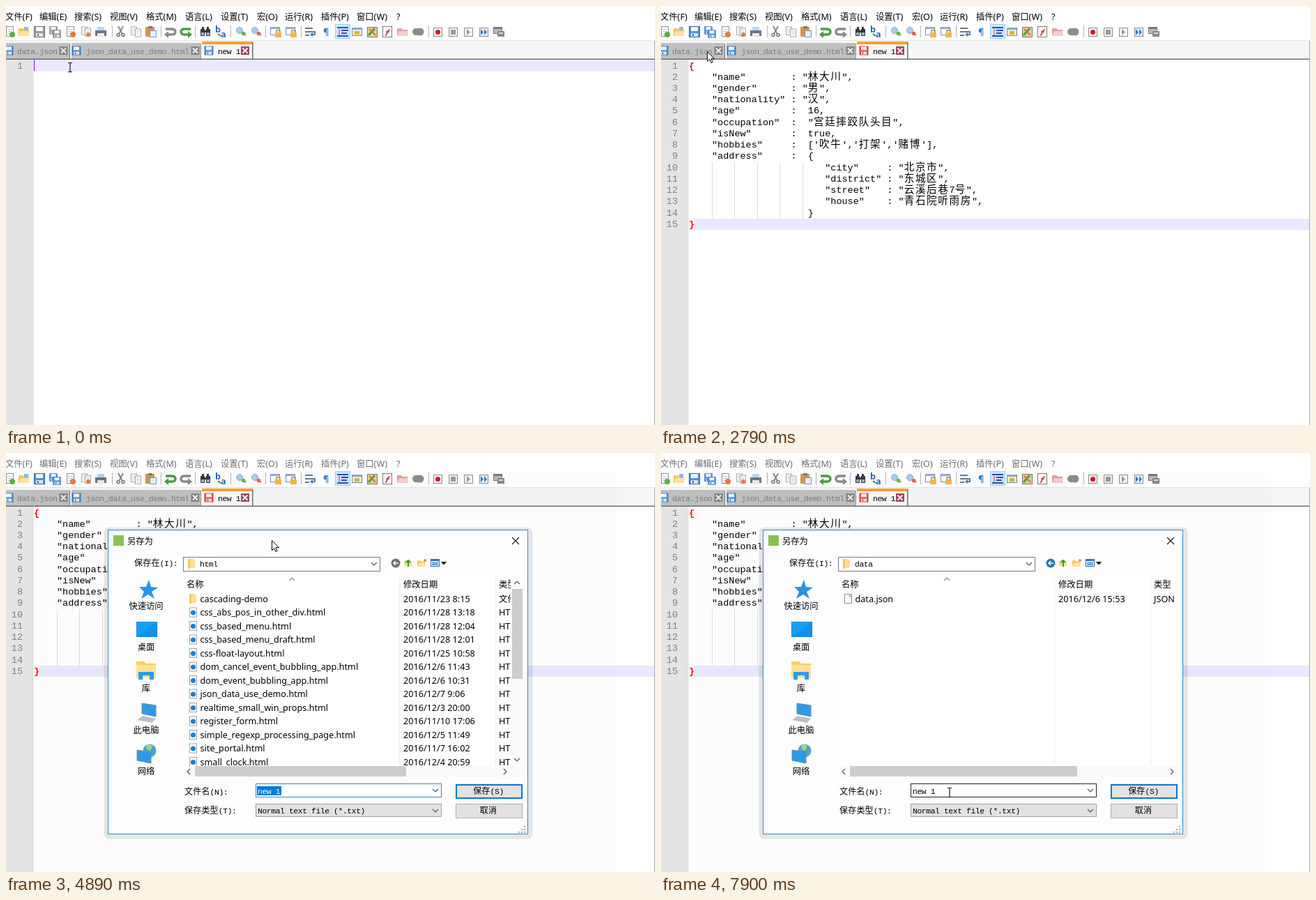
These frames come from a looping animation (931 by 601 pixels, 8 s). An HTML page:

```html
<!DOCTYPE html>
<html lang="zh-CN">
<head>
<meta charset="utf-8">
<style>
html, body { margin: 0; width: 100%; height: 100%; overflow: hidden; background: #fff; }
svg { display: block; width: 931px; height: 601px; }
text { white-space: pre; fill: #000; }
.ui { font: 12.65px 'Noto Sans', 'Noto Sans CJK SC', 'Noto Sans CJK', sans-serif; }
.ui .han { font-size: 12.3px; }
.mono { font: 11.4px 'Liberation Mono', 'Noto Sans CJK SC', 'Noto Sans CJK', monospace; letter-spacing: -.42px; }
.mono .han { font-size: 12px; font-weight: 300; letter-spacing: .2px; }
.code { font: 13.53px 'Liberation Mono', 'Noto Sans CJK SC', 'Noto Sans CJK', monospace; }
.code .han { font-size: 14.6px; font-weight: 300; letter-spacing: 1.6px; }
.num text { fill: #808080; text-anchor: end; }
.brace { fill: #f00; font-weight: bold; }
.dim { fill: #7d7d7d; }
.mid { text-anchor: middle; }
.blurred #menubar text { fill: #6d6d6d; }
.soft { fill: #e2e2e2; }
.opening .soft { fill: #f4f4f4; }
</style>
</head>
<body>
<svg id="stage" viewBox="0 0 931 601"></svg>
<script>
const stage = document.getElementById('stage');

// Drawing helpers
const rect = (x, y, w, h, fill, more = '') =>
  `<rect x="${x}" y="${y}" width="${w}" height="${h}" fill="${fill}" ${more}/>`;
const box = (x, y, w, h, fill, stroke, more = '') =>
  rect(x + .5, y + .5, w, h, fill, `stroke="${stroke}" ${more}`);
const path = (d, stroke, width = 1, fill = 'none') =>
  `<path d="${d}" stroke="${stroke}" stroke-width="${width}" fill="${fill}"/>`;
const fillPath = (d, fill) => path(d, 'none', 0, fill);
const disc = (x, y, r, fill, more = '') => `<circle cx="${x}" cy="${y}" r="${r}" fill="${fill}" ${more}/>`;
const text = (x, y, s, cls = 'ui', more = '') =>
  `<text x="${x}" y="${y}" class="${cls}" ${more}>${s.replace(/[\u4e00-\u9fff]+/g, '<tspan class="han">$&</tspan>')}</text>`;
const group = (cls, inner, more = '') => `<g class="${cls}" ${more}>${inner}</g>`;
const at = (x, y, inner, scale = 1) => `<g transform="translate(${x} ${y}) scale(${scale})">${inner}</g>`;
const swap = (before, after) => group('fresh', before) + group('pasted', after);
const chevron = (x, y, dx, dy, color = '#555') =>
  path(dx ? `M${x - 2 * dx} ${y - 4}l${4 * dx} 4l${-4 * dx} 4` : `M${x - 4} ${y - 2 * dy}l4 ${4 * dy}l4 ${-4 * dy}`, color, 1.2);

// Icons, centred on the origin
const floppy = (main, dark) => box(-8, -8, 15, 15, main, dark) + rect(-5, -7, 10, 6, '#f4f8fc') +
  rect(-5, 2, 10, 5, '#dfe8f0') + rect(-3, 3, 2, 3, dark);
const blueDisk = floppy('#4a96e0', '#2a66ad'), greyDisk = floppy('#9a9a9a', '#707070');
const redDisk = floppy('#f0504f', '#c01f25');
const pair = icon => at(-2, -2, icon, .7) + at(3, 3, icon, .7);
const page = box(-5, -8, 10, 14, '#fff', '#8a8f98') + path('M-2.5 -3.5h6M-2.5 -.5h6M-2.5 2.5h4', '#b9c4d2');
const folder = (c = '#f5c45a', front = '#ffe39a') => fillPath('M-8 -5h6l2 2h7v9h-15z', c) + fillPath('M-8 6l3 -7h13l-2 7z', front);
const smallFolder = fillPath('M-5 -7h8l2 2v11h-10z', '#ffe08c') + rect(-5, -7, 3, 14, '#f4c95f');
const badge = (c, d = 4) => disc(4, 4, d, c);
const lens = c => path('M3 2L7 5', '#a5713c', 2) + disc(-2, -2, 4.5, '#a9cdec', 'stroke="#8fa9c6"') + disc(3.5, 2.5, 2.8, c);
const hook = (c, flip) => `<g transform="scale(${flip} 1)">` +
  path('M-7 -4h9q5 0 5 4t-5 4h-6', c, 3.4) + fillPath('M-3 -1v10l-6 -5z', c) + '</g>';
const windowLock = box(-8, -7, 13, 11, '#fff', '#7791b8') + rect(-7, -7, 12, 3, '#89aede') + rect(-1, 1, 9, 7, '#f2b94a') +
  path('M1 1v-3h5v3', '#b98726', 1.4);
const frame = c => box(-6, -6, 12, 12, '#f5f5f5', '#8d8d8d') + c;

const toolbar = [
  [5, page + badge('#57b13e')],
  [26, folder() + rect(0, -7, 6, 5, '#8fb8e8')],
  [48, swap(greyDisk, blueDisk)],
  [70, swap(pair(greyDisk), pair(blueDisk))],
  [92, page + badge('#e87a3f')],
  [114, at(-2, -1, page, .8) + at(3, 1, page, .8) + badge('#e87a3f', 3)],
  [136, rect(-5, -7, 10, 6, '#b9d4f3') + rect(-8, -2, 16, 8, '#6b7482') + rect(-5, 2, 10, 6, '#e8edf2')],
  [164, path('M-3 -8L3 3M4 -8L-2 3', '#8a8a8a', 2) + disc(-3, 4.5, 2, 'none', 'stroke="#777" stroke-width="1.6"') + disc(4, 4.5, 2, 'none', 'stroke="#777" stroke-width="1.6"')],
  [186, at(-3, -1, page, .8) + at(3, 2, page, .8)],
  [208, rect(-8, -7, 13, 14, '#d69746') + rect(-4, -8, 6, 3, '#777') + box(-2, -2, 9, 9, '#eaf2fb', '#6e95c8')],
  [236, swap(hook('#8a8a8a', 1), hook('#4c9a45', 1))],
  [258, swap(hook('#4c9a45', -1), hook('#8a8a8a', -1))],
  [286, rect(-7, -4, 6, 10, '#303a46') + rect(1, -4, 6, 10, '#303a46') + rect(-5, -7, 3, 3, '#303a46') + rect(2, -7, 3, 3, '#303a46') + rect(-2, -2, 4, 3, '#303a46') + rect(-6, 1, 4, 4, '#9fb0c0') + rect(2, 1, 4, 4, '#9fb0c0')],
  [308, text(-8, 1, 'b', 'ui', 'style="fill:#2864b0;font-weight:bold"') + text(0, 8, 'a', 'ui', 'style="fill:#2864b0;font-weight:bold"') + path('M-4 3l4 3', '#3c8b45', 2)],
  [337, lens('#5bb65a')],
  [359, lens('#e2605c')],
  [387, windowLock],
  [409, windowLock],
  [437, path('M-8 -5h11M-8 0h14v4h-5M-8 5h6', '#65788f', 2) + fillPath('M-1 4l4 -3v6z', '#3b79c8')],
  [459, text(-4, 5, '¶', 'ui', 'style="fill:#2f7fd8;font-weight:bold"')],
  [483, box(-11, -11, 21, 20, '#cce8ff', '#99d1ff') + path('M-8 -6h16M-2 -2h10M-2 2h8M-8 6h16', '#2451b7', 2) + path('M-5 -4v9', '#d33', 1)],
  [503, box(-7, -6, 14, 11, '#fff3c4', '#6284b5') + rect(-7, -6, 14, 3, '#7fa6db') + fillPath('M-3 -1h7v5h-7z', '#e8ad32')],
  [525, box(-7, -7, 14, 14, '#e5d486', '#777') + path('M-5 5L4 -5', '#4f9c4e', 3) + path('M-4 -4L5 5', '#d2703a', 2)],
  [547, box(-7, -8, 13, 15, '#fff', '#777') + path('M-3 5q2 0 3 -4t4 -4M-2 0h5', '#c8323a', 1.6)],
  [569, folder('#dfa09a', '#f3cfca')],
  [591, disc(-3, 0, 5, '#8c8c8c') + disc(3, 0, 5.5, '#8c8c8c') + rect(-5, -5, 10, 10, '#8c8c8c')],
  [619, frame(disc(.5, .5, 3.5, '#d8161e'))],
  [641, frame(rect(-3, -3, 7, 7, '#999'))],
  [663, frame(fillPath('M-2 -4l5 4.5l-5 4.5z', '#999'))],
  [685, frame(fillPath('M-4 -4l4 4.5l-4 4.5zM1 -4l4 4.5l-4 4.5z', '#2879d0'))],
  [707, box(-8, -7, 12, 9, '#bbb', '#777') + rect(-7, -7, 11, 3, '#777') + rect(-2, -1, 10, 8, '#888') + rect(0, 1, 6, 2, '#ddd')],
].map(([x, icon]) => at(x, 37, icon)).join('') +
  [152, 222, 271, 322, 372, 423, 606].map(x => rect(x, 28, 1, 17, '#b5b5b5')).join('');

const menubar = [[-1, '文件(F)'], [48, '编辑(E)'], [98, '搜索(S)'], [149, '视图(V)'], [201, '格式(M)'], [257, '语言(L)'],
  [308, '设置(T)'], [360, '宏(O)'], [400, '运行(R)'], [452, '插件(P)'], [503, '窗口(W)'], [560, '?']]
  .map(([x, s]) => text(x, 20, s)).join('');

const closeBox = (x, c) => rect(x - 5.5, 58, 12, 12, c) + path(`M${x - 3} 60.5l7 7m0 -7l-7 7`, '#f4f4f4', 1.8);
const tabs = rect(0, 50, 931, 27, '#f6f6f6') + rect(0, 49, 931, 1, '#e4e4e4') +
  rect(0, 53, 91, 23, '#c0c0c0') + rect(94, 53, 185, 23, '#c0c0c0') + rect(91, 54, 1, 22, '#777') + rect(279, 54, 1, 22, '#999') +
  rect(281, 52, 73, 24, '#f8f8f8') + rect(281, 51, 73, 4, '#f9a12f') + rect(353, 52, 1.5, 24, '#6d6d6d') +
  rect(0, 75.5, 931, 1.5, '#707070') +
  at(4, 64, blueDisk, .8) + at(101, 64, blueDisk, .8) + at(291, 64, swap(blueDisk, redDisk), .8) +
  text(16, 69, 'data.json', 'mono dim') + text(115, 69, 'json_data_use_demo.html', 'mono dim') + text(304, 69, 'new 1', 'mono') +
  closeBox(82, '#858585') + closeBox(271, '#858585') + closeBox(342.5, '#a04a63');

// Editor
const ROW = 16.23;
const field = (indent, key, colon, value) => ' '.repeat(indent) + `"${key}"`.padEnd(colon - indent) + ':' + value;
const lines = [
  field(4, 'name', 18, ' "林大川",'),
  field(4, 'gender', 18, ' "男",'),
  field(4, 'nationality', 18, ' "汉",'),
  field(4, 'age', 18, '  16,'),
  field(4, 'occupation', 18, '  "宫廷摔跤队头目",'),
  field(4, 'isNew', 18, '  true,'),
  field(4, 'hobbies', 18, "  ['吹牛','打架','赌博'],"),
  field(4, 'address', 18, '  {'),
  field(24, 'city', 35, ' "北京市",'),
  field(24, 'district', 35, ' "东城区",'),
  field(24, 'street', 35, ' "云溪后巷7号",'),
  field(24, 'house', 35, ' "青石院听雨房",'),
  ' '.repeat(21) + '}',
];
const lineY = i => +(89.5 + ROW * i).toFixed(1);
const numbers = (from, to) => {
  let out = '';
  for (let i = from; i <= to; i++) out += text(24, lineY(i - 1), String(i), 'code');
  return group('num', out);
};
const editor = rect(0, 77, 39.5, 524, '#e4e4e4') + numbers(1, 1) +
  group('fresh', rect(39.5, 77, 891, 16.5, '#e8e8ff')) +
  group('pasted', numbers(2, 15) + rect(48, 305, 883, 16, '#e8e8ff') + group('flat', rect(48, 305, 202, 16, '#fff')) +
    [0, 1, 2, 3, 4].map(i => path(`M${73.5 + Math.round(i * 32.45)} 224v81`, '#dcdcdc')).join('') +
    lines.map((s, i) => text(40.5, lineY(i + 1), s, 'code')).join('') +
    text(40, lineY(0), '{', 'code brace') + text(40, lineY(14), '}', 'code brace')) +
  group('caretTop', rect(40, 77, 1, 16, '#8000ff')) + group('caretEnd', rect(48, 305, 1, 16, '#8000ff')) +
  rect(930, 50, 1, 551, '#a8a8a8') + group('veil', rect(37, 26, 839, 575, '#000', 'opacity=".012"'));

// Context menu; a leading "~" marks a disabled entry
let menuY = 91;
const menuItems = ['~剪切(T)', '~复制(C)', '粘贴(P)', '~删除(D)', '全选(A)', '-', '开始/结束选中', '-', '高亮标记', '清除标记', '-', '插件命令',
  '-', '大写(U)', '小写(L)', '-', '打开文件', '在网络上搜索', '-', '切换单行注释', '区块注释', '清除区块注释', '隐藏行'].map(s => {
  const y = menuY;
  menuY += s === '-' ? 7 : 18.7;
  if (s === '-') return rect(118, y + 3, 150, 1, '#d0d0d0');
  return text(119, y + 14, s.replace('~', ''), s[0] === '~' ? 'ui dim' : 'ui');
}).join('');
const contextMenu = group('context', rect(96, 92, 180, 368, '#000', 'opacity=".2"') + box(92, 88, 180, 367, '#f2f2f2', '#a8a8a8') +
  '<rect id="pick" x="93" width="178" height="18.7" fill="#91c9f7"/>' + menuItems) +
  `<g id="paste">${rect(92, 128, 179, 19.5, '#91c9f7')}${text(119, 143, '粘贴(P)')}</g>`;

// Save dialog
const fileIcon = {
  dir: smallFolder,
  git: `<g opacity=".5">${smallFolder}</g>`,
  html: box(-5, -7, 10, 13, '#fff', '#9aa4ae') + disc(.5, .5, 3.6, '#1e7fd0'),
  md: box(-4, -7, 9, 13, '#fff', '#9aa4ae') + rect(-6, -2, 10, 7, '#1d5a9e'),
  json: box(-5, -7, 10, 13, '#fff', '#8c8c8c') + path('M2.5 -6.5v3h3', '#8c8c8c'),
};
const typeName = { dir: '文件夹', git: '文件夹', html: 'HTML 文件', md: 'MD 文件', json: 'JSON 文件' };
const listing = (cls, place, clip, rows) => group(cls, text(278, 163, place, 'mono') +
  group('', text(707, 193, '类型') + rows.map(([kind, name, date], i) => {
    const y = 209 + 19.5 * i;
    return at(268, y, fileIcon[kind]) + text(278.5, y + 4.5, name) + text(570, y + 4.5, '2016/' + date) + text(707, y + 4.5, typeName[kind]);
  }).join(''), `clip-path="url(#${clip})"`));
const htmlDir = [['dir', 'cascading-demo', '11/23 8:15'], ['html', 'css_abs_pos_in_other_div', '11/28 13:18'], ['html', 'css_based_menu', '11/28 12:04'],
  ['html', 'css_based_menu_draft', '11/28 12:01'], ['html', 'css-float-layout', '11/25 10:58'], ['html', 'dom_cancel_event_bubbling_app', '12/6 11:43'],
  ['html', 'dom_event_bubbling_app', '12/6 10:31'], ['html', 'json_data_use_demo', '12/7 9:06'], ['html', 'realtime_small_win_props', '12/3 20:00'],
  ['html', 'register_form', '11/10 17:06'], ['html', 'simple_regexp_processing_page', '12/5 11:49'], ['html', 'site_portal', '11/7 16:02'],
  ['html', 'small_clock', '12/4 20:59']].map(([k, n, d]) => [k, k === 'html' ? n + '.html' : n, d]);
const webDir = [['git', '.git', '11/25 14:17'], ['dir', 'css', '11/17 16:53'], ['dir', 'data', '12/7 10:34'], ['dir', 'html', '12/6 16:00'],
  ['dir', 'imges', '12/4 20:41'], ['dir', 'js', '11/14 15:09'], ['md', 'README.md', '11/14 15:11']];

const screen = (x, y) => fillPath(`M${x} ${y}l20 3v16l-20 -4z`, '#2b9be8') + path(`M${x} ${y}l20 3v16l-20 -4z`, '#7c8894');
const places = fillPath('M205 182l3 10 10 1 -9 6 4 10 -9 -6 -10 6 4 -10 -7 -7 10 0z', '#2795e6') +
  box(187, 242, 29, 21, '#16a0f5', '#1583cc') + fillPath('M187 264l29 -22v22z', '#0e92ea') +
  fillPath('M187 299h11l3 3h14v8h-28z', '#f5cf62') + rect(187, 304, 28, 18, '#ffe190') + fillPath('M190 325v-11h22v11h-6v-6h-10v6z', '#2b9fe6') +
  screen(195, 359) + fillPath('M188 383l8 -6 19 4 -6 6z', '#b9c0c8') +
  disc(206, 427, 9.5, '#4aa3cf') + fillPath('M201 420q5 -5 9 0l-3 7 -5 -2z', '#9ed58c') + screen(188, 426) +
  [[223.5, '快速访问'], [283, '桌面'], [342, '库'], [402, '此电脑'], [461, '网络']].map(([y, s]) => text(201, y, s, 'ui mid')).join('');
const dialog = rect(140.5, 106.5, 615, 447, '#000', 'rx="8" opacity=".09"') + box(146, 110, 602, 436, '#fdfdfd', '#2b8bd1') +
  rect(154, 118, 15, 15, '#8cc152') + text(174, 131, '另存为') + path('M726 121l10 10m0 -10l-10 10', '#222', 1.2) +
  text(184, 162, '保存在(I):', 'mono') + box(254, 149, 282, 20, '#fff', '#7a7a7a') + at(266, 159, smallFolder) + chevron(528, 159, 0, 1) +
  group('noBack', disc(559, 158, 6.5, '#6f6f6f')) + group('back', disc(559, 158, 6.5, '#2474b5')) + path('M563 158h-7m3 -3l-3 3l3 3', '#fff', 1.5) +
  at(577, 158, folder(), .7) + path('M577 163v-9m-3 3l3 -3l3 3', '#2f9a35', 2) + at(596, 158, folder(), .75) + disc(601, 154, 2, '#ee8a3a') +
  box(609, 152, 12, 10, '#fff', '#2865b0') + rect(609, 152, 13, 3, '#2f72c4') + path('M611 157.5h9M611 160h9', '#2f72c4', 1.5) +
  fillPath('M624 156h8l-4 4.5z', '#000') + places +
  rect(255, 178, 487, 287, '#fff') + '<rect id="hover" x="258" width="444" height="19.5" fill="#e5f3ff"/>' +
  rect(564, 179, 1, 269, '#ededed') + rect(702, 179, 1, 269, '#ededed') +
  text(259, 193, '名称') + text(570, 193, '修改日期') + chevron(410, 181, 0, -1, '#888') +
  listing('html', 'html', 'narrow', htmlDir) + listing('web', 'web-front-exercises', 'wide', webDir) +
  listing('data', 'data', 'wide', [['json', 'data.json', '12/6 15:53']]) +
  rect(255, 449, 487, 16, '#fafafa') + chevron(262, 457, -1, 0) +
  group('html', rect(726, 179, 15, 270, '#fafafa') + rect(726, 195, 15, 129, '#cdcdcd') + chevron(733, 186, 0, -1) + chevron(733, 440, 0, 1) +
    rect(271, 449, 303, 15, '#cdcdcd') + chevron(716, 457, 1, 0)) +
  group('later', rect(271, 449, 326, 15, '#cdcdcd') + chevron(733, 457, 1, 0)) +
  text(256, 490, '文件名(N):', 'mono') + box(358, 474, 266, 19, '#fff', '#2b8bd1', 'id="nameBox"') + chevron(616, 484, 0, 1) +
  group('selected', rect(360, 478, 35, 13, '#0078d7') + text(361, 488.5, 'new 1', 'mono', 'style="fill:#fff"')) +
  group('plain', text(361, 488.5, 'new 1', 'mono')) +
  text(256, 517, '保存类型(T):', 'mono') + box(358, 503, 266, 18, '', '#a0a0a0', 'class="soft"') + chevron(616, 513, 0, 1) +
  text(361, 517, 'Normal text file (*.txt)', 'mono') +
  rect(646, 476, 94, 19, '', 'class="soft" stroke="#0078d7" stroke-width="2"') + text(692, 489, '保存(S)', 'mono mid') +
  box(645, 503, 95, 20, '', '#adadad', 'class="soft"') + text(692, 517, '取消', 'mono mid') +
  [[744, 536], [744, 540], [744, 544], [740, 540], [740, 544], [736, 544]].map(([x, y]) => rect(x - 1, y - 1, 2, 2, '#a8a8a8')).join('');

const pointer = group('arrow', path('M.5 .5v14l3.3 -3 2.2 5 2.2 -1 -2.2 -4.8h4.5z', '#000', 1, '#fff')) +
  group('beam', path('M-3 -6.5h2.5l.5 .5l.5 -.5h2.5M0 -6v12M-3 6.5h2.5l.5 -.5l.5 .5h2.5', '#111', 1.2));

stage.innerHTML = `<defs><clipPath id="narrow"><path d="M255 179h469v270h-469z"/></clipPath>
  <clipPath id="wide"><path d="M255 179h486v270h-486z"/></clipPath></defs>` +
  rect(0, 0, 931, 601, '#fff') + `<g id="menubar">${menubar}</g>` + toolbar + tabs + editor + contextMenu +
  `<g id="dialog">${dialog}</g><g id="pointer">${pointer}</g>`;

// Timeline: the picture only changes at these moments
const LOOP = 8000;
const ticks = [0, 160, 470, 610, 750, 890, 1030, 1160, 1440, 1590, 1710, 1830, 2130, 2260, 2400, 2540, 2680, 2820, 2950, 3090,
  3210, 3340, 3490, 3620, 3760, 3890, 4030, 4310, 4460, 4740, 4890, 5040, 5180, 5320, 5460, 5600, 5730,
  5850, 5990, 6130, 6260, 6410, 6600, 6780, 6930, 7070, 7210, 7350, 7490, 7630, 7760, 7900];
const route = [[0, 92, 88], [610, 92, 88], [1030, 134, 138], [1160, 136, 144], [1830, 136, 144], [2820, 55, 52], [2950, 52, 50], [3340, 52, 50],
  [4030, 497, 190], [4460, 492, 174], [4740, 430, 147], [4890, 381, 125], [5040, 381, 125], [5600, 576, 156], [5850, 577, 156],
  [6260, 326, 234], [6410, 322, 243], [6930, 322, 243], [7760, 410, 484], [7900, 414, 487], [LOOP, 414, 487]];

function pointerAt(t) {
  const i = route.findIndex(k => k[0] > t);
  const [t0, x0, y0] = route[i - 1], [t1, x1, y1] = route[i];
  const p = (t - t0) / (t1 - t0);
  return [Math.round(x0 + (x1 - x0) * p), Math.round(y0 + (y1 - y0) * p)];
}

const el = id => document.getElementById(id);
const between = (t, a, b) => t >= a && t < b;

function draw(t) {
  const [x, y] = pointerAt(t);
  const beam = t < 610 || (between(t, 1440, 3210) && y > 77) || t >= 7760;
  const web = between(t, 5850, 6930);
  const flags = {
    fresh: t < 1440, pasted: t >= 1440, veil: t >= 3210,
    caretTop: t < 160 || between(t, 470, 610), caretEnd: between(t, 2130, 2540),
    context: between(t, 610, 1440), flat: between(t, 3210, 3490),
    html: t < 5850, web, data: t >= 6930, later: t >= 5850, noBack: t < 5850, back: t >= 5850,
    selected: t < 6600, plain: t >= 6600, arrow: !beam, beam,
  };
  for (const name in flags)
    for (const node of stage.getElementsByClassName(name)) node.style.display = flags[name] ? '' : 'none';

  stage.classList.toggle('blurred', t >= 3090);
  stage.classList.toggle('opening', t < 3490);
  el('pointer').setAttribute('transform', `translate(${x} ${y})`);
  el('pick').setAttribute('y', 91 + 18.7 * Math.min(2, Math.max(0, Math.floor((y - 91) / 18.7))));
  el('paste').style.opacity = between(t, 1440, 1590) ? 1 : between(t, 1590, 1710) ? .8 : between(t, 1710, 1830) ? .4 : 0;

  const row = Math.floor((y - 199) / 19.5);
  const hover = el('hover');
  hover.style.display = web && between(x, 258, 702) && between(row, 0, webDir.length) ? '' : 'none';
  hover.setAttribute('y', 199.5 + 19.5 * row);
  hover.setAttribute('fill', t >= 6600 ? '#cce8ff' : '#e5f3ff');
  el('nameBox').setAttribute('stroke', t >= 7760 ? '#222' : '#2b8bd1');

  const [dx, dy] = t < 4740 ? [111, 49] : t < 4890 ? [x - 381, y - 125] : [0, 0];
  const zoom = t < 3340 ? .95 : t < 3490 ? .997 : 1;
  const win = el('dialog');
  win.style.display = t >= 3210 ? '' : 'none';
  win.style.opacity = t < 3340 ? .4 : t < 3490 ? .98 : 1;
  win.setAttribute('transform', `translate(${dx} ${dy}) translate(447 328) scale(${zoom}) translate(-447 -328)`);
}

const start = performance.now();
let shown = -1;
function loop() {
  const now = (performance.now() - start) % LOOP;
  const tick = ticks.filter(t => t <= now).pop();
  if (tick !== shown) draw(shown = tick);
  requestAnimationFrame(loop);
}
loop();
</script>
</body>
</html>
```
